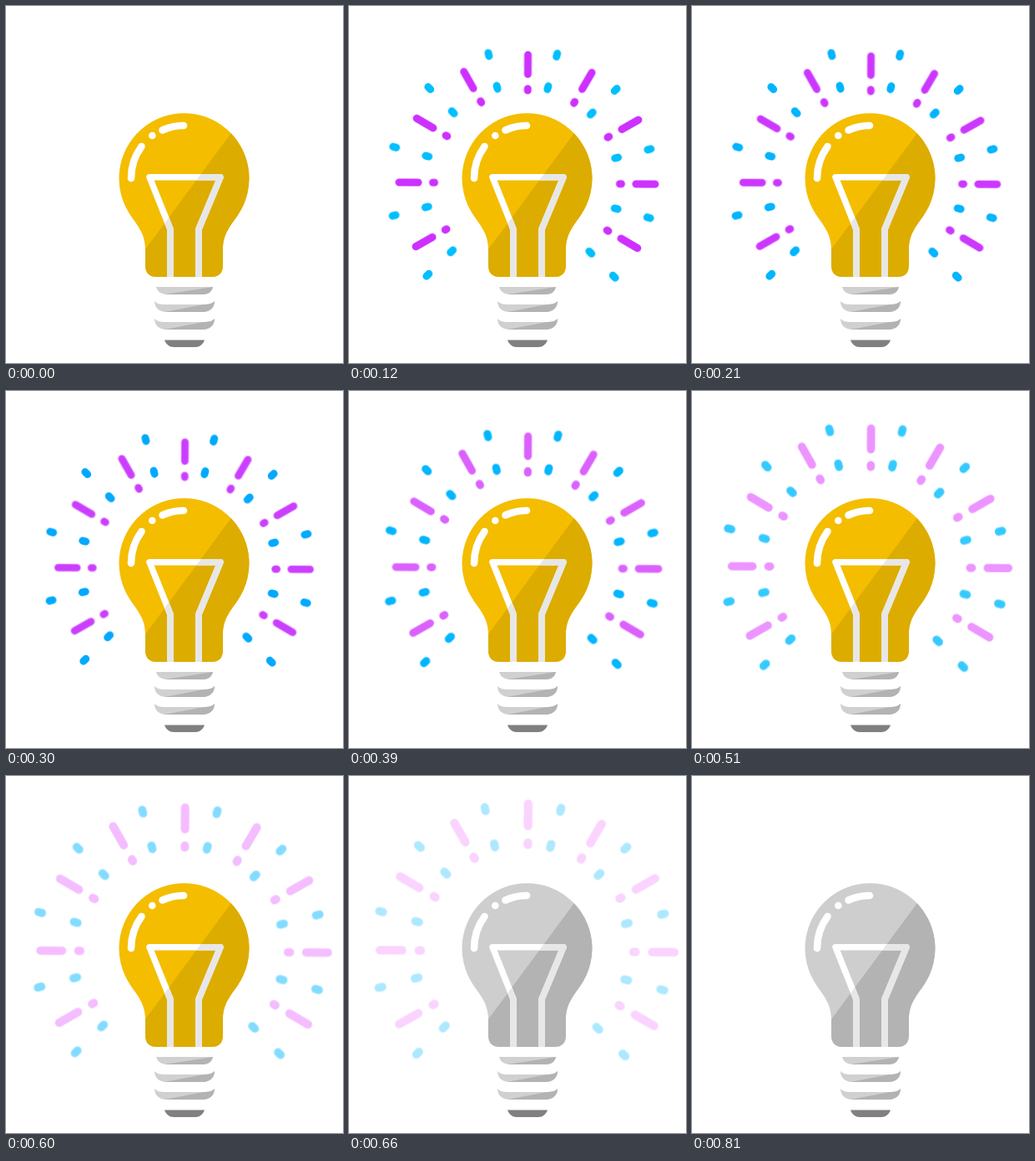
An HTML page without scripts for the animation above (1080 ms loop, 404 by 427 pixels).

```html
<!DOCTYPE html>
<html lang="en">
<head>
<meta charset="utf-8">
<title>Light bulb</title>
<style>
  html, body { margin: 0; width: 100%; height: 100%; overflow: hidden; background: #fff; }
  svg { display: block; width: 100%; height: 100%; }

  .glass { animation: glass 1080ms step-end infinite; }
  .shade { animation: shade 1080ms step-end infinite; }
  .wire { fill: none; stroke: #fff; stroke-width: 7.6; stroke-linejoin: round; }
  .dim { stroke: #e7e7e7; }
  .shine { fill: none; stroke: #fff; stroke-width: 8.6; stroke-linecap: round; }
  .rays { fill: none; stroke-width: 9; stroke-linecap: round; }
  .long { transform-origin: 213.5px 228px; animation: long 1080ms infinite, fade 1080ms infinite; }
  .short { transform-origin: 207px 230px; animation: short 1080ms infinite, fade 1080ms infinite; }

  @keyframes glass { 0% { fill: #f4bd00; } 58.33%, 100% { fill: #cecece; } }
  @keyframes shade { 0% { fill: #dcac00; } 58.33%, 100% { fill: #b3b3b3; } }

  /* each segment advances in 30 ms ticks */
  @keyframes fade {
    0% { opacity: 0; animation-timing-function: steps(4); }
    11.111% { opacity: 1; animation-timing-function: steps(11); }
    41.667% { opacity: 1; animation-timing-function: steps(5); }
    55.555% { opacity: .49; animation-timing-function: steps(2); }
    61.111% { opacity: .32; animation-timing-function: steps(5); }
    75%, 100% { opacity: 0; }
  }
  @keyframes long {
    0% { transform: scale(.86); stroke: #cd30ff; animation-timing-function: steps(4); }
    11.111% { transform: scale(1); stroke: #cd30ff; animation-timing-function: steps(6); }
    27.777% { transform: scale(.984); stroke: #cb3eff; animation-timing-function: steps(5); }
    41.667% { transform: scale(1.052); stroke: #e678ff; animation-timing-function: steps(5); }
    55.555% { transform: scale(1.122); stroke: #e978ff; animation-timing-function: steps(2); }
    61.111% { transform: scale(1.149); stroke: #ee78ff; animation-timing-function: steps(5); }
    75%, 100% { transform: scale(1.186); stroke: #ee78ff; }
  }
  @keyframes short {
    0% { transform: scale(.9); stroke: #00bfff; animation-timing-function: steps(4); }
    11.111% { transform: scale(1); stroke: #00bfff; animation-timing-function: steps(6); }
    27.777% { transform: scale(1); stroke: #00a9ff; animation-timing-function: steps(5); }
    41.667% { transform: scale(1.046); stroke: #00bfff; animation-timing-function: steps(5); }
    55.555% { transform: scale(1.09); stroke: #00b8ff; animation-timing-function: steps(2); }
    61.111% { transform: scale(1.107); stroke: #00b8ff; animation-timing-function: steps(5); }
    75%, 100% { transform: scale(1.135); stroke: #00b8ff; }
  }
</style>
</head>
<body>
<svg viewBox="0 0 404 427">
  <defs>
    <path id="dash" d="M0-111V-113M0-130.5V-153.5"/>
    <path id="dots" d="M0-115.5V-119.5M0-156V-160"/>
    <path id="bulb" d="M149 250A78 78 0 1 1 278 250C270 262 260 272 260 291V310Q260 324 246 324H181Q167 324 167 310V291C167 272 157 262 149 250Z"/>
    <path id="wire" d="M197 324V267L172 204.7H257L231 267V324"/>
    <clipPath id="half"><path d="M270 152L167 291V330H300V152Z"/></clipPath>
    <g id="ring">
      <path fill="#d0d0d0" d="M178 353C181 356 185 357 190 357H238C243 357 247 356 250 353C250 361 244 366 236 366H192C184 366 178 361 178 353Z"/>
      <path fill="#b3b3b3" d="M190 366L237 357C243 357 247 356 250 353C250 361 244 366 236 366Z"/>
    </g>
  </defs>

  <g class="rays long">
    <g transform="translate(213.5 212) rotate(.4)">
      <use href="#dash" transform="rotate(-120)"/>
      <use href="#dash" transform="rotate(-90)"/>
      <use href="#dash" transform="rotate(-60)"/>
      <use href="#dash" transform="rotate(-30)"/>
      <use href="#dash"/>
      <use href="#dash" transform="rotate(30)"/>
      <use href="#dash" transform="rotate(60)"/>
      <use href="#dash" transform="rotate(90)"/>
      <use href="#dash" transform="rotate(120)"/>
    </g>
  </g>
  <g class="rays short">
    <g transform="translate(207 211) rotate(.5)">
      <use href="#dots" transform="rotate(-135)"/>
      <use href="#dots" transform="rotate(-105)"/>
      <use href="#dots" transform="rotate(-75)"/>
      <use href="#dots" transform="rotate(-45)"/>
      <use href="#dots" transform="rotate(-15)"/>
      <use href="#dots" transform="rotate(15)"/>
      <use href="#dots" transform="rotate(45)"/>
      <use href="#dots" transform="rotate(75)"/>
      <use href="#dots" transform="rotate(105)"/>
      <use href="#dots" transform="rotate(135)"/>
    </g>
  </g>

  <use href="#bulb" class="glass"/>
  <g clip-path="url(#half)"><use href="#bulb" class="shade"/></g>
  <use href="#wire" class="wire"/>
  <g clip-path="url(#half)"><use href="#wire" class="wire dim"/></g>
  <path class="shine" d="M150 206A64 64 0 0 1 162.500 168M175.300 155h.01M187.500 148.500A64 64 0 0 1 213 143"/>

  <path fill="#d0d0d0" d="M180 336H248C247 341 243 345 236 345H193C186 345 181 341 180 336Z"/>
  <path fill="#b3b3b3" d="M190 345L248 336C247 341 243 345 236 345Z"/>
  <use href="#ring"/>
  <use href="#ring" y="21"/>
  <path fill="#808080" d="M190 399.500H238C236 405 232 408 227 408H201C196 408 192 405 190 399.500Z"/>
</svg>
</body>
</html>
```
